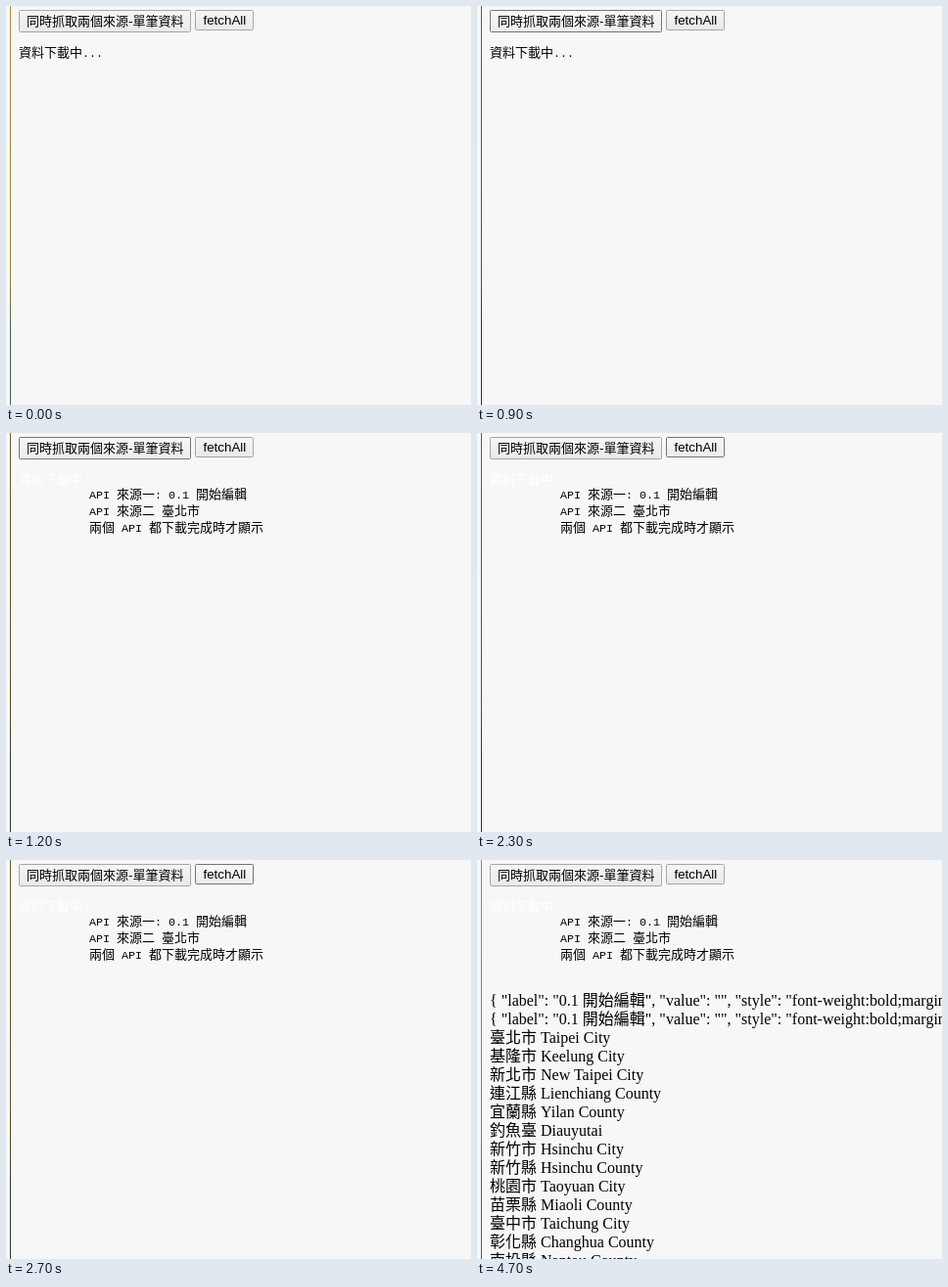
An HTML page that plays this animation: 475 by 408 pixels, repeating every 4800 ms.

```html
<!DOCTYPE html>
<html lang="zh-Hant">
<head>
<meta charset="utf-8">
<title>fetchAll</title>
<style>
html, body { margin: 0; width: 100%; height: 100%; overflow: hidden; background: #f7f7f7; }
svg { display: block; width: 475px; height: 408px; }
text { white-space: pre; fill: #000; }
.mono { font-family: "Liberation Mono", "Noto Sans CJK TC", monospace; font-size: 11.67px; }
.mono .han { font-size: 13px; }
.sans { font-family: "Liberation Sans", "Noto Sans CJK TC", sans-serif; font-size: 13.33px; }
.sans .han { font-size: 13px; }
.serif { font-family: "Liberation Serif", "Noto Sans CJK TC", serif; font-size: 16px; }
.han { font-family: "Noto Sans CJK TC", "Noto Sans CJK", sans-serif; font-weight: 300; }
</style>
</head>
<body>
<svg id="stage" viewBox="0 0 475 408"></svg>
<script>
const LOOP = 4800;
const stage = document.getElementById('stage');

// Chinese runs get their own size and font
const label = (cls, x, y, str) => {
  const runs = str.match(/[\u4e00-\u9fff]+|[^\u4e00-\u9fff]+/g);
  const spans = runs.map(r => /[\u4e00-\u9fff]/.test(r) ? `<tspan class="han">${r}</tspan>` : r);
  return `<text class="${cls}" x="${x}" y="${y}">${spans.join('')}</text>`;
};

const gradient = (id, top, bottom) =>
  `<linearGradient id="${id}" x1="0" y1="0" x2="0" y2="1">
    <stop stop-color="${top}"/><stop offset="1" stop-color="${bottom}"/>
  </linearGradient>`;

const edge = (id, top, middle, low) =>
  `<linearGradient id="${id}" gradientUnits="userSpaceOnUse" x1="0" y1="0" x2="0" y2="408">
    <stop stop-color="${top}"/><stop offset=".68" stop-color="${middle}"/>
    <stop offset=".8" stop-color="${low}"/><stop offset="1" stop-color="${low}"/>
  </linearGradient>`;

const button = (id, x, w, h, tx, ty, str) =>
  `<rect id="${id}" x="${x + .5}" y="4.5" width="${w - 1}" height="${h - 1}" rx="1"/>` +
  label('sans', tx, ty, str);

const record = '{ "label": "0.1 開始編輯", "value": "", "style": "font-weight:bold;margin-bottom';
const rows = [
  record, record,
  '臺北市 Taipei City', '基隆市 Keelung City', '新北市 New Taipei City',
  '連江縣 Lienchiang County', '宜蘭縣 Yilan County', '釣魚臺 Diauyutai',
  '新竹市 Hsinchu City', '新竹縣 Hsinchu County', '桃園市 Taoyuan City',
  '苗栗縣 Miaoli County', '臺中市 Taichung City', '彰化縣 Changhua County',
  '南投縣 Nantou County'
];
const results = ['API 來源一: 0.1 開始編輯', 'API 來源二 臺北市', '兩個 API 都下載完成時才顯示'];

stage.innerHTML = `<defs>
  ${gradient('face', '#f5f5f5', '#e9e9e9')}
  ${gradient('hover', '#f8f8f8', '#ececec')}
  ${gradient('press', '#e2e2e2', '#efefef')}
  ${edge('bright', '#a08c3c', '#96822f', '#3f6a50')}
  ${edge('dim', '#66602a', '#565020', '#2c3a30')}
  </defs>
  <rect width="475" height="408" fill="#f7f7f7"/>
  <rect id="side" x="4" width="1" height="408"/>
  ${button('single', 13, 176, 23, 21, 20, '同時抓取兩個來源-單筆資料')}
  ${button('all', 193, 60, 21, 201.5, 19, 'fetchAll')}
  <g id="loading">${label('mono', 13, 52, '資料下載中...')}</g>
  <g id="results">${results.map((s, i) => label('mono', 85, 67 + 17 * i, s)).join('')}</g>
  <g id="list">${rows.map((s, i) => label('serif', 13, 149 + 19 * i, s)).join('')}</g>`;

const el = id => document.getElementById(id);
const [side, single, all, loading, output, list] =
  ['side', 'single', 'all', 'loading', 'results', 'list'].map(el);
const loadingText = loading.querySelector('text');

const between = (t, a, b) => t >= a && t < b;
const show = (node, on) => node.setAttribute('visibility', on ? 'visible' : 'hidden');

function paint(node, state) {
  node.setAttribute('fill', `url(#${state})`);
  node.setAttribute('stroke', state === 'face' ? '#a6a6a6' : '#747474');
}

function draw(t) {
  side.setAttribute('fill', between(t, 900, 4700) ? 'url(#dim)' : 'url(#bright)');
  paint(single, between(t, 600, 1700) ? 'hover' : 'face');
  paint(all, between(t, 2600, 2700) ? 'press' : between(t, 2300, 3500) ? 'hover' : 'face');
  loadingText.style.fill = t < 1200 ? '#000' : '#fff';
  show(output, t >= 1200);
  show(list, t >= 3500);
}

const start = performance.now();
function tick() {
  draw((performance.now() - start) % LOOP);
  requestAnimationFrame(tick);
}
tick();
</script>
</body>
</html>
```
